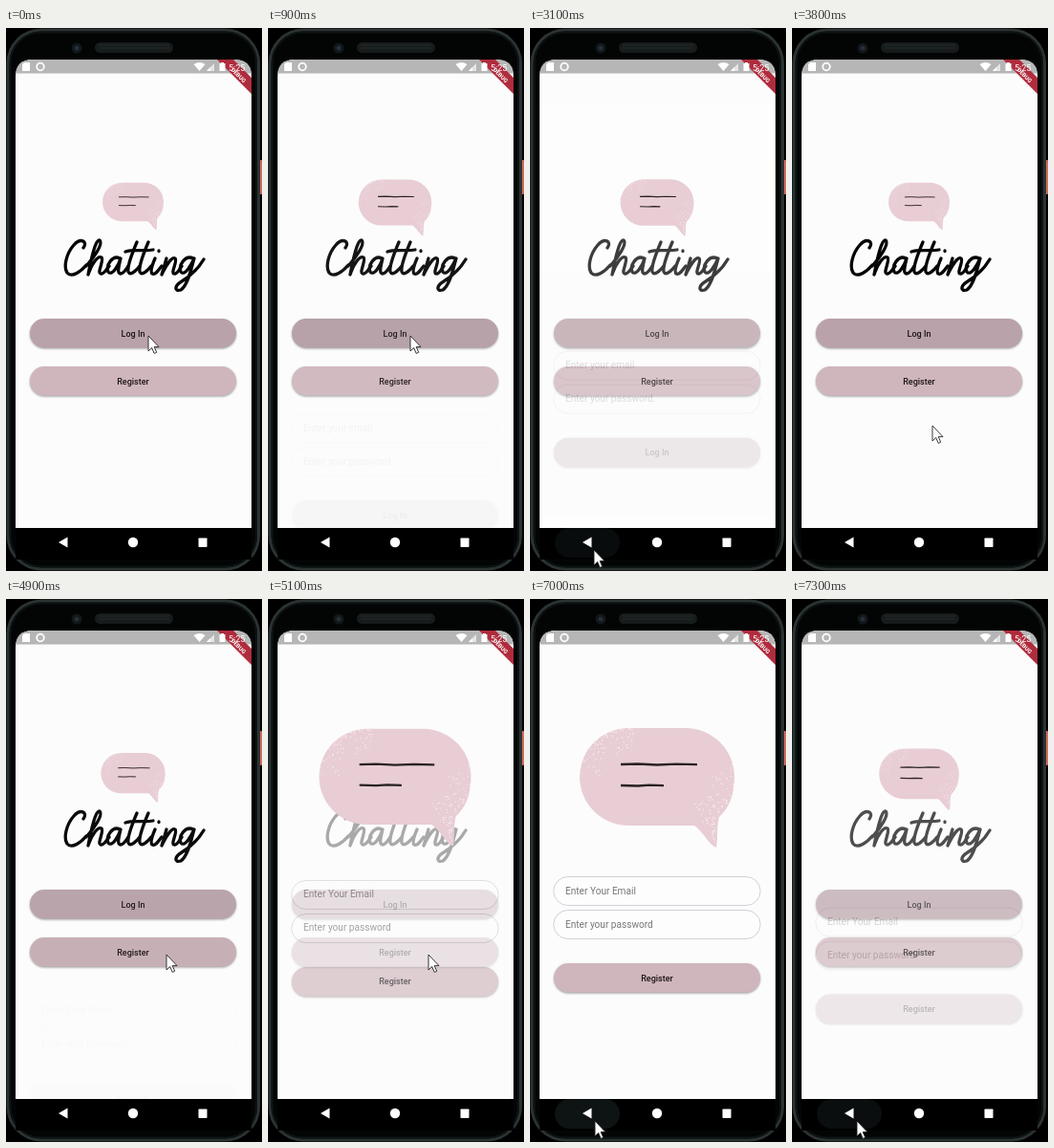
An HTML page for the animation above (7.4 s loop, 268x568 px).

```html
<!DOCTYPE html>
<html lang="en">
<head>
<meta charset="utf-8">
<title>Chatting</title>
<style>
  html, body { margin: 0; width: 100%; height: 100%; overflow: hidden; background: #000; }
  svg { display: block; width: 268px; height: 568px; }
  text { font-family: Roboto, sans-serif; }
  .label { font-size: 9px; font-weight: 500; text-anchor: middle; fill: #1c1418; }
  .hint { font-size: 10.1px; fill: #777; }
  .button { filter: drop-shadow(0 1.5px 1.3px rgba(0, 0, 0, .38)); }
  .title path { fill: none; stroke: #050505; stroke-width: 3.3; stroke-linecap: round; stroke-linejoin: round; }
</style>
</head>
<body>
<svg viewBox="0 0 268 568">
  <defs>
    <clipPath id="screen"><path d="M10 523V51Q10 33 28 33H239Q257 33 257 51V523Z"/></clipPath>
  </defs>

  <!-- phone body -->
  <rect x="264" y="138" width="4" height="36" rx="1" fill="#cf6a5c"/>
  <rect x="2" y="2" width="262.5" height="564" rx="35" fill="#050808" stroke="#2c3333" stroke-width="3"/>
  <rect x="4.5" y="4.5" width="257.5" height="559" rx="32" fill="#030505" stroke="#0d1212" stroke-width="2"/>
  <rect x="93" y="15" width="82" height="11" rx="5.5" fill="#171b1b"/>
  <path d="M97 18H171M97 21H171" stroke="#252a2a"/>
  <circle cx="74" cy="21" r="5.5" fill="#12171a"/>
  <circle cx="74" cy="21" r="2.5" fill="#252f38"/>

  <g clip-path="url(#screen)">
    <rect x="10" y="33" width="247" height="490" fill="#fcfcfc"/>
    <g id="home"></g>
    <g id="page"></g>
    <g id="bubble">
      <path fill="#e8cdd4" d="M-30-51H30A51 51 0 0 1 81 0C81 21 74 34 65 42C62 52 64 63 62 74C54 71 49 58 39 51H-30A51 51 0 0 1-30-51Z"/>
      <path id="specks" stroke="#faf2f4" stroke-width="1"/>
      <path fill="none" stroke="#2a2225" stroke-width="2.3" d="M-38-13L-20-13.5L0-12.5L20-13.3L42-12.8M-38 9L-20 9.5L-8 8.7L7 9.2"/>
    </g>

    <!-- status bar -->
    <rect x="10" y="33" width="247" height="14.5" fill="#b6b6b6"/>
    <path fill="#b02c3d" d="M221 33H238L257 52V69Z"/>
    <text transform="translate(242 51) rotate(45)" font-size="6" font-weight="700" text-anchor="middle" fill="#fff">DEBUG</text>
    <g fill="#fff">
      <path d="M19 36H25V45H17V38Z"/>
      <circle cx="36" cy="40.5" r="3.8" fill="none" stroke="#fff" stroke-width="1.8"/>
      <path d="M196.500 38Q202.500 34 208.500 38L202.500 45Z"/>
      <path d="M210 45L218 37V45Z" opacity=".65"/>
      <path d="M210 45L214 41V45Z"/>
      <path d="M225 36H228V37H229.500V45H223.500V37H225Z"/>
      <text x="233" y="44.500" font-size="9">5:25</text>
    </g>
  </g>

  <!-- navigation bar -->
  <rect x="10" y="523" width="247" height="33" fill="#000"/>
  <rect id="glow" x="26" y="523" width="68" height="31" rx="15.5" fill="#0e1414"/>
  <g fill="#fff">
    <path d="M55 538L64.500 532.500V543.500Z"/>
    <circle cx="133" cy="538" r="5.200"/>
    <rect x="201.500" y="533.500" width="9" height="9.500" rx=".7"/>
  </g>
  <path id="cursor" d="M0 0V16L3.700 12.500L6.200 18.400L8.700 17.300L6.200 11.600H11Z" fill="#fff" stroke="#222" stroke-width=".9"/>
</svg>

<script>
const $ = id => document.getElementById(id);
const MAUVE = '#b9a2a9', ROSE = '#cfb6bc';

const button = (y, color, label, id = '') => `
  <rect class="button" x="25" y="${y}" width="216" height="30.5" rx="15.2" fill="${color}"/>
  ${id && `<rect id="${id}" x="25" y="${y}" width="216" height="30.5" rx="15.2" fill="#78666c"/>`}
  <text class="label" x="133" y="${y + 18.5}">${label}</text>`;

const field = (y, color, hint) => `
  <rect x="24.700" y="${y}" width="216.500" height="30" rx="15" fill="#fdfdfd" stroke="${color}" stroke-width=".8"/>
  <text class="hint" x="37" y="${y + 18}">${hint}</text>`;

const form = (line, email, password, color, label) => `
  <rect x="10" y="33" width="247" height="490" fill="#fcfcfc"/>
  ${field(290.5, line, email)}${field(325.5, line, password)}${button(381, color, label)}`;

const forms = {
  login: form('#d8c1c6', 'Enter your email', 'Enter your password.', MAUVE, 'Log In'),
  register: form('#c8c3ce', 'Enter Your Email', 'Enter your password', ROSE, 'Register')
};

// Handwritten title, one stroke group per letter
const title = [
  'M81 230C86 223 78 219 71 227C63 236 60 250 64 256C69 262 79 254 84 248',
  'M84 249C92 240 102 226 98 222C94 220 89 242 86 258C90 246 96 238 100 240C103 243 95 256 99 257C102 258 106 252 108 249',
  'M119 241C112 237 104 248 107 255C111 260 118 248 120 241C118 249 116 257 120 257C123 257 126 252 128 249',
  'M137 224C131 238 127 250 128 255C130 260 137 253 140 249',
  'M149 224C143 238 139 250 140 255C142 260 149 253 152 249',
  'M125 234C134 231 144 234 154 232',
  'M156 241C153 248 151 255 153 257C156 259 160 253 163 249M160 233V233.500',
  'M168 241L163 258C168 247 174 239 177 241C180 244 172 256 176 257C179 258 182 252 184 249',
  'M196 241C188 237 180 248 183 255C187 260 194 248 197 241C194 252 190 270 183 274C176 276 176 270 184 265C192 260 200 254 207 242'
];
$('home').innerHTML =
  `<g class="title" role="img" aria-label="Chatting">${title.map(d => `<path d="${d}"/>`).join('')}</g>` +
  button(304, MAUVE, 'Log In', 'tapLogin') + button(354, ROSE, 'Register', 'tapRegister');

// Worn edges of the bubble: upper left, lower right and the tail
let seed = 7;
const rnd = () => (seed = seed * 16807 % 2147483647) / 2147483647;
let specks = '';
for (let i = 0; i < 210; i++) {
  const left = i % 2, r = 51 - 24 * rnd() ** 2;
  const a = left ? Math.PI * (1 + .55 * rnd()) : Math.PI * (.5 * rnd() - .1);
  let x = (left ? -30 : 30) + r * Math.cos(a), y = r * Math.sin(a);
  if (i % 8 == 0) { y = 42 + 26 * rnd(); x = 61 - rnd() * (70 - y) * .5; }
  specks += `M${x.toFixed(1)} ${y.toFixed(1)}h${(.4 + 1.1 * rnd()).toFixed(1)}`;
}
$('specks').setAttribute('d', specks);

const clamp = x => Math.min(1, Math.max(0, x));

const bezier = (x1, y1, x2, y2) => x => {
  const at = (a, b, u) => 3 * a * u * (1 - u) ** 2 + 3 * b * u * u * (1 - u) + u ** 3;
  let lo = 0, hi = 1;
  for (let i = 0; i < 20; i++) {
    const mid = (lo + hi) / 2;
    if (at(x1, x2, mid) < x) lo = mid; else hi = mid;
  }
  return at(y1, y2, lo);
};
const slide = bezier(.4, 0, .2, 1), fade = bezier(.42, 0, 1, 1);

// time, x, y of the pointer tip
const track = [
  [0, 149, 322], [1600, 149, 322], [1700, 140, 352], [1800, 103, 455], [1900, 77, 523], [2000, 77, 523],
  [2100, 70, 540], [2200, 67, 546], [3400, 67, 546], [3500, 92, 497], [3600, 119, 449], [3700, 119, 449],
  [3800, 147, 416], [3900, 159, 393], [4100, 168, 372], [5700, 168, 372], [5800, 161, 385],
  [6000, 118, 462], [6200, 74, 537], [6300, 68, 546], [7400, 68, 546]
];
function pointer(t) {
  const i = track.findIndex(k => k[0] > t), [t0, x0, y0] = track[i - 1], [t1, x1, y1] = track[i];
  const k = (t - t0) / (t1 - t0);
  return [x0 + (x1 - x0) * k, y0 + (y1 - y0) * k];
}

const visits = [
  { name: 'login', tap: 600, push: 841, press: 2500, pop: 2923 },
  { name: 'register', tap: 4700, push: 4866, press: 6700, pop: 7144 }
];
let shown = '';

function draw(t) {
  const v = visits[t < 4000 ? 0 : 1], back = t >= v.pop;
  const p = back ? 1 - clamp((t - v.pop) / 300) : clamp((t - v.push) / 300);
  if (shown != v.name) $('page').innerHTML = forms[shown = v.name];
  $('page').setAttribute('opacity', fade(p));
  $('page').setAttribute('transform', `translate(0 ${130 * (1 - slide(p))})`);

  const h = back ? 1 - slide(1 - p) : slide(p);
  $('bubble').setAttribute('transform', `translate(133 ${182 + 4 * h}) scale(${.395 + .605 * h})`);

  const tap = t >= v.tap && t < v.pop ? .1 : 0;
  $('tapLogin').setAttribute('opacity', v.name == 'login' ? tap : 0);
  $('tapRegister').setAttribute('opacity', v.name == 'register' ? tap : 0);

  const glow = clamp((t - v.press + 100) / 200) * (1 - clamp((t - v.pop - 100) / 200));
  $('glow').setAttribute('opacity', t < v.press ? 0 : glow);
  $('cursor').setAttribute('transform', `translate(${pointer(t)})`);
}

const start = performance.now();
function tick() {
  draw(Math.floor((performance.now() - start) % 7400 / 100) * 100);
  requestAnimationFrame(tick);
}
tick();
</script>
</body>
</html>
```
